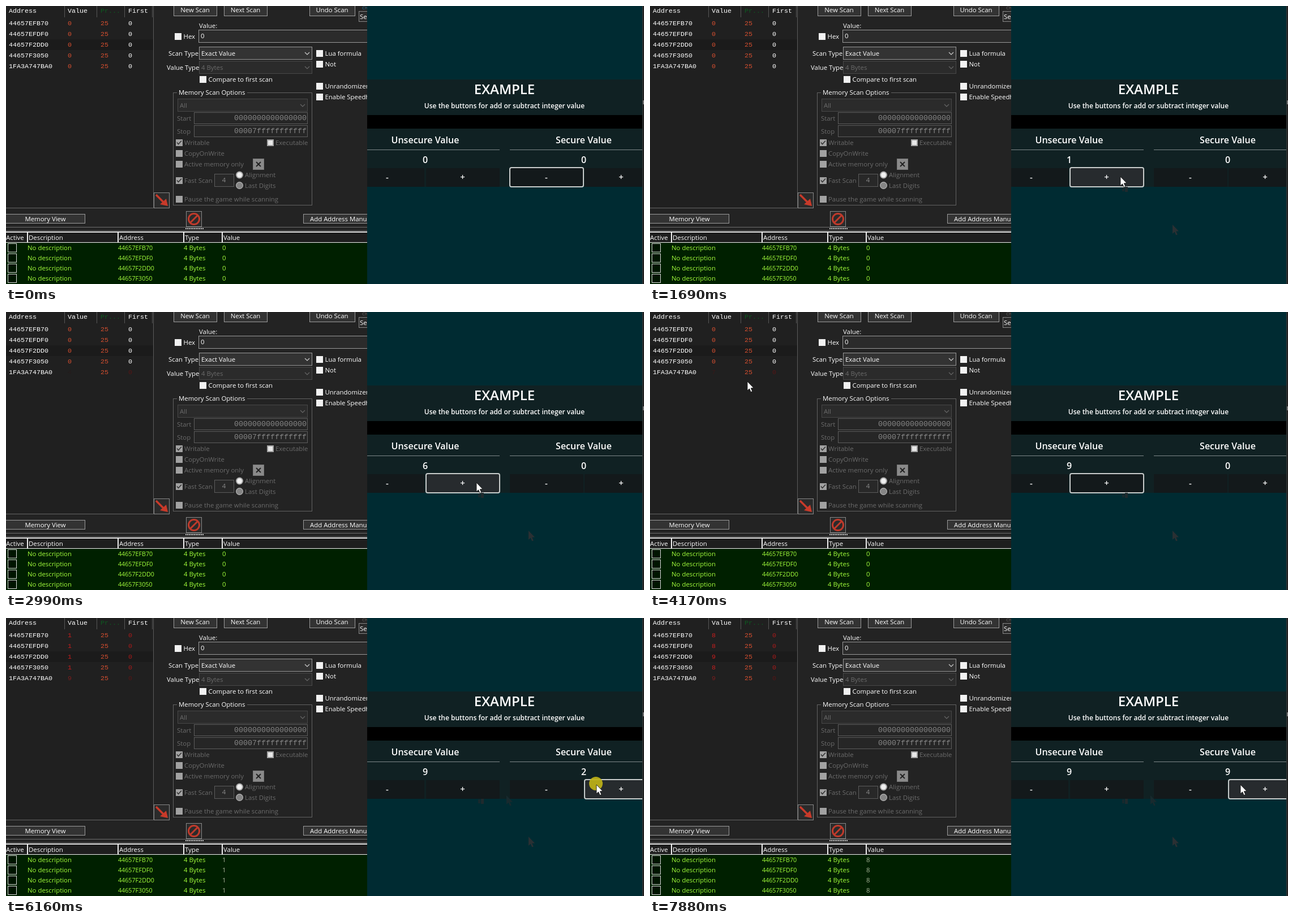
Animation, 1127 px wide and 492 px high, one loop 8 s. Source, as an HTML page with a canvas:

```html
<!DOCTYPE html>
<html lang="en">
<head>
<meta charset="utf-8">
<title>Memory scan demo</title>
<style>
html, body { margin: 0; width: 100%; height: 100%; overflow: hidden; background: #222; }
canvas { display: block; }
</style>
</head>
<body>
<canvas id="stage" width="1127" height="492"></canvas>
<script>
const ctx = document.getElementById('stage').getContext('2d');
const LOOP = 8000;
const UI = '11.4px "Open Sans", sans-serif';
const UI_DIGITS = '10.7px "Open Sans", sans-serif';
const MONO = '11.67px "Liberation Mono", monospace';
const GAME = size => `600 ${size}px "Open Sans", sans-serif`;
const GREY = '#6b6b6b', WHITE = '#fff', RED = '#c03a2b', ORANGE = '#d64f30';

// ---- timeline ----
const unsecurePresses = [1470, 1820, 2100, 2370, 2650, 2850, 3060, 3470, 3670];
const securePresses = [5200, 6080, 6500, 6710, 6910, 7120, 7330, 7540, 7740];
const allPresses = [...unsecurePresses, ...securePresses];
const HOLD = 70, FLASH = 70;
const path = [
  [390, 1050, 480], [670, 922, 387], [880, 831, 302],
  [3960, 831, 302], [4170, 172, 123], [4450, 172, 123],
  [4660, 885, 315], [4730, 1043, 337], [4800, 1043, 337], [4940, 1043, 295]
];
const scanned = [[0, 0], [5820, 1], [6570, 2], [6850, 4], [7330, 6], [7670, 8]];
const scannedThird = [[0, 0], [5820, 1], [6570, 2], [6850, 4], [6980, 5], [7330, 6], [7670, 8], [7810, 9]];
const scannedLast = [[0, 0], [2100, 2], [2650, 4], [3130, 6], [3740, 7], [4450, 9]];
const listed = [[0, 0], [5620, 1], [6640, 3], [6850, 4], [7400, 6], [7670, 8]];

const stepAt = (steps, t) => steps.filter(s => s[0] <= t).pop()[1];
const countClicks = (presses, t) => presses.filter(p => p + HOLD <= t).length;

function cursorAt(t) {
  if (t < 400) return null;
  const q = Math.floor((t + 30) / 70) * 70 - 30;
  const i = path.findIndex(p => p[0] > q);
  if (i < 0) return path[path.length - 1].slice(1);
  const [a, b] = [path[Math.max(i - 1, 0)], path[i]];
  const k = Math.max(0, (q - a[0]) / (b[0] - a[0]));
  return [a[1] + (b[1] - a[1]) * k, a[2] + (b[2] - a[2]) * k];
}

// ---- drawing helpers ----
function fill(x, y, w, h, color) {
  ctx.fillStyle = color;
  ctx.fillRect(x, y, w, h);
}
function box(x, y, w, h, color, border) {
  fill(x, y, w, h, color);
  ctx.strokeStyle = border;
  ctx.lineWidth = 1;
  ctx.strokeRect(x + .5, y + .5, w - 1, h - 1);
}
function text(str, x, y, color = WHITE, font = UI, align = 'left') {
  ctx.font = font;
  ctx.fillStyle = color;
  ctx.textAlign = align;
  ctx.fillText(str, x, y);
}
function line(points, color, width) {
  ctx.beginPath();
  points.forEach(p => ctx.lineTo(...p));
  ctx.strokeStyle = color;
  ctx.lineWidth = width;
  ctx.stroke();
}
function polygon(points, color) {
  ctx.beginPath();
  points.forEach(p => ctx.lineTo(...p));
  ctx.closePath();
  ctx.fillStyle = color;
  ctx.fill();
}
function circle(x, y, r, color) {
  ctx.beginPath();
  ctx.arc(x, y, r, 0, 7);
  ctx.fillStyle = color;
  ctx.fill();
}
function checkbox(x, y, label, disabled, checked) {
  fill(x + 1, y + 1, 12, 12, disabled ? '#a2a2a2' : '#f2f2f2');
  if (checked) line([[x + 3, y + 6.5], [x + 5.5, y + 9.5], [x + 11, y + 3.5]], '#333', 1.5);
  text(label, x + (disabled ? 16 : 16.5), y + 11, disabled ? GREY : WHITE);
}
function combo(x, y, w, label, disabled) {
  box(x, y, w, 23, disabled ? '#2b2b2b' : '#333', disabled ? '#484848' : '#999');
  text(label, x + 4, y + 16, disabled ? GREY : WHITE);
  const c = x + w - 9, m = y + 10;
  line([[c - 4, m], [c, m + 4], [c + 4, m]], disabled ? '#666' : '#ccc', 1.2);
}
function button(x, y, w, h, label) {
  box(x, y, w, h, '#333', '#9b9b9b');
  text(label, x + w / 2, y + h - 4, WHITE, UI, 'center');
}
function pointer(x, y, color, outline) {
  ctx.save();
  ctx.translate(x, y);
  polygon([[0, 0], [0, 16], [3.6, 12.8], [6.2, 18.6], [8.8, 17.4], [6.3, 11.8], [11, 11.4]], color);
  if (outline) {
    ctx.strokeStyle = outline;
    ctx.lineWidth = .8;
    ctx.stroke();
  }
  ctx.restore();
}

// ---- scanner window ----
function drawResults(t) {
  fill(0, 0, 260, 357, '#202020');
  fill(0, 59, 260, 19, '#1b1b1b');
  fill(0, 357, 261, 1, '#666');
  fill(260, 0, 1, 358, '#5a5a5a');
  [103, 160, 209, 258].forEach(x => fill(x, 0, 1, 20, '#555'));
  [['Address', 5], ['Value', 109], ['Pr...', 167], ['First', 216]].forEach(([label, x], i) =>
    text(label, x, 12, i === 2 ? '#0d5a20' : WHITE, MONO));

  ['44657EFB70', '44657EFDF0', '44657F2DD0', '44657F3050', '1FA3A747BA0'].forEach((address, i) => {
    const y = 34 + 19 * i, last = i === 4;
    const value = stepAt(last ? scannedLast : i === 2 ? scannedThird : scanned, t);
    let valueColor = ORANGE, firstColor = WHITE;
    if (value && last) {
      valueColor = t < 3740 ? '#251c1c' : t < 4450 ? '#381a1a' : '#7a1e1e';
      firstColor = '#561616';
    } else if (value) {
      valueColor = '#c81e1e';
      firstColor = '#a81a1a';
    }
    text(address, 5, y, WHITE, MONO);
    text(value, 109, y, valueColor, MONO);
    text('25', 167, y, ORANGE, MONO);
    text('0', 216, y, firstColor, MONO);
  });
}

function drawOptions(t) {
  button(296, -4, 77, 22, '');
  button(385, -4, 77, 22, '');
  button(536, -4, 81, 22, '');
  text('New Scan', 334, 11, WHITE, UI, 'center');
  text('Next Scan', 423, 11, WHITE, UI, 'center');
  text('Undo Scan', 576, 11, WHITE, UI, 'center');
  text('Ch', 629, 6, t < 1540 ? '#287a9e' : '#666', '8px "Open Sans", sans-serif');
  box(623, 9, 40, 19, '#2b2b2b', '#888');
  text('Se', 625, 23);

  text('Value:', 341, 39);
  checkbox(297, 47, 'Hex');
  box(340, 42, 320, 23, '#2b2b2b', '#999');
  text('0', 344, 57);
  text('Scan Type', 287, 88);
  combo(341, 72, 200, 'Exact Value');
  text('Value Type', 284, 113);
  combo(341, 97, 200, '4 Bytes', true);
  checkbox(341, 123, 'Compare to first scan');
  checkbox(547, 77, 'Lua formula');
  checkbox(547, 96, 'Not');
  checkbox(547, 135, 'Unrandomizer');
  checkbox(547, 154, 'Enable Speedhack');

  box(295, 153, 246, 200, '#232323', '#626262');
  fill(302, 150, 124, 8, '#232323');
  text('Memory Scan Options', 305, 157);
  combo(303, 164, 230, 'All', true);
  [['Start', '0000000000000000', 188], ['Stop', '00007fffffffffff', 211]].forEach(([label, value, y]) => {
    text(label, 302, y + 15, GREY);
    box(332, y, 201, 21, '#262626', '#5c5c5c');
    text(value, 531, y + 14, '#858585', '13.33px "Liberation Mono", monospace', 'right');
  });
  checkbox(299, 235, 'Writable', true, true);
  checkbox(460, 235, 'Executable', true);
  fill(463, 238, 8, 8, '#e8e8e8');
  checkbox(299, 254, 'CopyOnWrite', true);
  checkbox(299, 273, 'Active memory only', true);
  box(436, 270, 20, 20, '#8a8a8a', '#777');
  line([[442, 276], [450, 284]], '#222', 2);
  line([[450, 276], [442, 284]], '#222', 2);
  checkbox(299, 302, 'Fast Scan', true, true);
  box(368, 297, 35, 23, '#282828', '#5c5c5c');
  text('4', 385, 312, '#888', UI, 'center');
  circle(412.5, 299, 6.5, '#aaa');
  circle(412.5, 299, 4.5, '#f0f0f0');
  circle(412.5, 317.5, 6.5, '#b5b5b5');
  circle(412.5, 317.5, 5.3, '#858585');
  text('Alignment', 422, 303, GREY);
  text('Last Digits', 422, 322, GREY);
  checkbox(299, 335, 'Pause the game while scanning', true);
}

function drawAddressList(t) {
  box(261, 330, 28, 28, '#2b2b2b', '#888');
  line([[265, 334], [280, 349]], '#c83a2a', 3.5);
  polygon([[286, 354], [283, 341], [272, 351]], '#c83a2a');
  button(-1, 368, 141, 17, 'Memory View');
  box(318, 363, 28, 28, '#2b2b2b', '#888');
  ctx.beginPath();
  ctx.arc(332, 377, 9.5, 0, 7);
  ctx.strokeStyle = RED;
  ctx.lineWidth = 3;
  ctx.stroke();
  line([[325.5, 383.5], [338.5, 370.5]], RED, 3);
  box(525, 368, 150, 17, '#333', '#9b9b9b');
  text('Add Address Manually', 537, 381);

  fill(0, 391, 638, 1, '#707070');
  for (let x = 317; x < 348; x += 3) fill(x, 393, 2, 2, '#ccc');
  fill(0, 397, 638, 1, '#606060');
  fill(0, 399, 638, 2, '#e0e0e0');
  fill(0, 401, 638, 17, '#1e1e1e');
  fill(0, 418, 638, 1, '#f0f0f0');
  fill(0, 419, 638, 73, '#002000');
  [37, 197, 313, 381].forEach(x => fill(x, 400, 2, 19, '#eee'));
  [['Active', 0], ['Description', 40], ['Address', 200], ['Type', 316], ['Value', 384]]
    .forEach(([label, x]) => text(label, x, 414));

  const value = stepAt(listed, t), lime = '#a4ff3c';
  ['44657EFB70', '44657EFDF0', '44657F2DD0', '44657F3050'].forEach((address, i) => {
    const y = 432 + 18 * i;
    box(3, y - 12, 16, 16, '#001500', '#ddd');
    text('No description', 38, y, lime);
    text(address, 198, y, lime, UI_DIGITS);
    text('4 Bytes', 314, y, lime);
    text(value, 382, y, value ? '#a8b598' : lime);
  });
}

// ---- game window ----
function drawGame(t) {
  const cursor = cursorAt(t);
  const pressed = allPresses.some(p => p <= t && t < p + HOLD);
  const flashing = allPresses.some(p => p + HOLD <= t && t < p + HOLD + FLASH);
  const focused = t < 1470 ? 2 : t < 5200 ? 1 : 3;

  fill(638, 0, 489, 492, '#002b32');
  fill(638, 130, 486, 63, '#102123');
  fill(638, 193, 486, 24, '#000');
  fill(638, 217, 486, 103, '#102123');
  text('EXAMPLE', 880.5, 156, WHITE, GAME(24), 'center');
  text('Use the buttons for add or subtract integer value', 880.5, 181, WHITE, GAME(12), 'center');

  [['Unsecure Value', 740.5, unsecurePresses], ['Secure Value', 1020.5, securePresses]]
    .forEach(([label, x, presses]) => {
      text(label, x, 243, WHITE, GAME(16), 'center');
      text(countClicks(presses, t), x, 278, WHITE, GAME(16), 'center');
    });
  fill(638, 254, 234, 1, '#7f8889');
  fill(890, 254, 234, 1, '#7f8889');

  ctx.save();
  ctx.beginPath();
  ctx.rect(638, 0, 486, 492);
  ctx.clip();
  [['-', 609], ['+', 742], ['-', 890], ['+', 1022]].forEach(([label, x], i) => {
    const hover = cursor && cursor[0] >= x && cursor[0] < x + 130 && cursor[1] > 287 && cursor[1] < 320;
    fill(x, 287, 130, 33, hover ? (pressed ? '#060b0e' : '#272b2e') : '#13191b');
    if (i === focused) {
      ctx.beginPath();
      ctx.roundRect(x, 286, 130, 34, 3);
      ctx.strokeStyle = '#c8cccb';
      ctx.lineWidth = 2;
      ctx.stroke();
    }
    text(label, x + 64.5, 308, WHITE, GAME(15), 'center');
  });
  ctx.restore();

  // faint trails left where the pointer has passed
  if (t >= 730) pointer(923, 387, '#2a3033');
  if (t >= 940) {
    fill(834, 321, 4, 7, '#16292d');
    fill(839, 320, 5, 9, '#1f2a2d');
  }
  if (t >= 4730) pointer(884, 314, '#182a2e');

  fill(1124, 0, 3, 492, '#202020');
  fill(1124, 0, 1, 492, '#343838');
  fill(1125, 167, 2, 7, '#777');

  if (!cursor) return;
  const [x, y] = cursor;
  if (flashing) circle(x - 1, y - 2, 12, 'rgba(190,178,24,.92)');
  pointer(x, y, '#fff', '#111');
}

function draw(t) {
  fill(0, 0, 1127, 492, '#232323');
  drawResults(t);
  drawOptions(t);
  drawAddressList(t);
  drawGame(t);
}

const start = performance.now();
function frame() {
  draw((performance.now() - start) % LOOP);
  requestAnimationFrame(frame);
}
frame();
</script>
</body>
</html>
```
